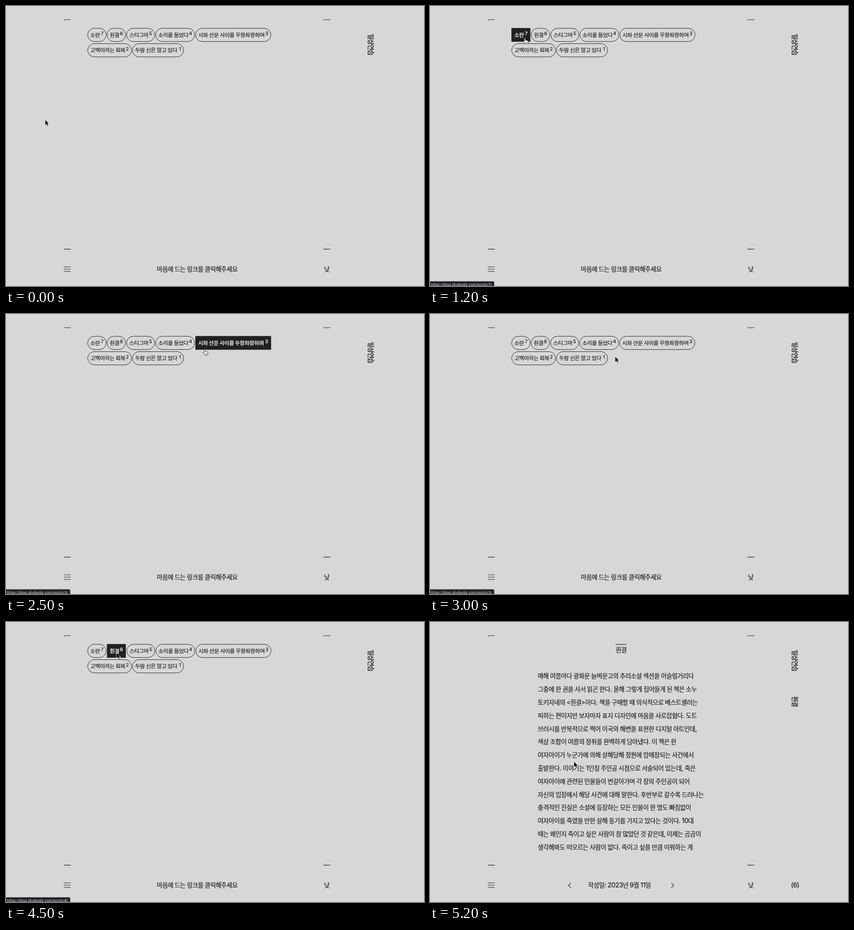
An HTML page that plays this animation: 914x613 px, repeating every 5700 ms.

```html
<!DOCTYPE html>
<html lang="ko">
<head>
<meta charset="utf-8">
<title>일상연습</title>
<style>
  html, body { margin: 0; width: 100%; height: 100%; overflow: hidden; background: #d7d7d7; }
  svg { display: block; }
  text {
    font: 13.5px Inter, "Noto Sans CJK KR", "Noto Sans CJK", sans-serif;
    letter-spacing: -.0333em; word-spacing: -.026em; white-space: pre;
    color: #1a1a1a; fill: currentColor; stroke: currentColor; stroke-width: .2;
  }
  .num { font-size: 1.066em; }
  .mid { text-anchor: middle; }
  .side { letter-spacing: -.07em; stroke-width: .35; }
  .line { fill: none; stroke: #222; stroke-width: 1.2; }
  .tag rect { fill: none; stroke: #222; rx: 14.5px; }
  .tag text { font-size: 11.9px; }
  .tag .sup { font-size: 10.6px; letter-spacing: 0; text-anchor: end; }
  .tag.on rect { fill: #212121; stroke: #212121; rx: 0; }
  .tag.on text { color: #e2e2e2; font-weight: 700; stroke: none; }
  #status text { font-size: 8.1px; letter-spacing: 0; color: #dcdee2; stroke: none; }
</style>
</head>
<body>
<svg width="914" height="613" viewBox="0 0 914 613">
  <path class="line" d="M126.5 30h15M694 30h15M126.5 532.4h15M694 532.4h15M126.5 571h15M126.5 576h15M126.5 581h15"/>
  <text class="side" transform="translate(793 61.5) rotate(90)">일상연습</text>
  <text class="mid" x="701.5" y="581">낮</text>

  <g id="list">
    <g id="tags"></g>
    <text class="mid" x="418" y="581">마음에 드는 링크를 클릭해주세요</text>
  </g>

  <g id="post">
    <path class="line" d="M406 49.2h23.5M308 571.2l-5.4 5.4 5.4 5.4M527.6 571.2l5.4 5.4-5.4 5.4"/>
    <text class="mid" x="418" y="65.6">흰결</text>
    <text class="side" transform="translate(793 162.5) rotate(90)">흰결</text>
    <g id="body"></g>
    <text class="mid" x="414.3" y="581" id="date"></text>
    <text class="mid" x="798.3" y="581"><tspan class="num">(6)</tspan></text>
  </g>

  <g id="status">
    <path d="M0 602.8h137.5q3 0 3 3V613H0z" fill="#202225" stroke="#8a8a8a" stroke-width=".5"/>
    <text x="1.8" y="612.7"></text>
  </g>

  <g id="cursor">
    <path id="arrow" transform="scale(1.06)" d="M0 0V12.2L2.8 9.6 4.7 13.8 6.7 12.9 4.9 8.9H8.5Z" fill="#000" stroke="#fff" stroke-width=".8"/>
    <g id="hand" stroke="#111" stroke-width=".8" stroke-linejoin="round">
      <path fill="#fff" d="M-1.3 1.2a1.2 1.2 0 0 1 2.4 0V5.2l1.3.1q.6-.5 1.4.1l.7.5q1-.5 1.6.5.9 0 .9 1.3V10q-.6 1.6-.9 3H.3Q-.8 11-2 9.6L-3.6 7.4q.4-1.6 1.7-.5l.6.7z"/>
      <path d="M1.3 8.8v2.4M3 8.8v2.4M4.7 8.8v2.4" stroke-width=".6"/>
    </g>
  </g>
</svg>
<script>
const LOOP = 5700, STEP = 100, BUSY = 4200, OPEN = 4700;
const $ = id => document.getElementById(id);
const digits = s => s.replace(/[\d.,:]+/g, '<tspan class="num">$&</tspan>');

const rows = [
  ['소란', '흰결', '스티그마', '소리를 들었다', '시와 산문 사이를 우왕좌왕하며'],
  ['고백이라는 회복', '두람 신은 알고 있다']
];
const TAG_H = 29, PAD = 5.7, GAP = 2.1;

// a tag is as wide as its syllables and spaces, plus its number and padding
function tagWidth(title) {
  const spaces = title.split(' ').length - 1;
  return (title.length - spaces) * 10.55 + spaces * 2.7 + 19.3;
}

const tags = [];
rows.forEach((titles, row) => {
  let x = 178.6;
  for (const title of titles) {
    const w = tagWidth(title);
    tags.push({ title, row, x, w, y: 48.8 + row * 33.6 });
    x += w + GAP;
  }
});
tags.forEach((tag, i) => { tag.id = tags.length - i; });

$('tags').innerHTML = tags.map(({ title, id, x, y, w }) => `<g class="tag">
  <rect x="${x}" y="${y}" width="${w}" height="${TAG_H}"/>
  <text x="${x + PAD}" y="${y + 18.7}">${title}</text>
  <text class="sup" x="${x + w - PAD}" y="${y + 15.5}">${id}</text></g>`).join('');
const tagEls = [...$('tags').children];

const lines = [
  '매해 여름마다 광화문 늘벼문고의 추리소설 섹션을 어슬렁거리다',
  '그중에 한 권을 사서 읽곤 한다. 올해 그렇게 집어들게 된 책은 소누',
  '토키자네의 &lt;흰결&gt;이다. 책을 구매할 때 의식적으로 베스트셀러는',
  '피하는 편이지만 보자마자 표지 디자인에 마음을 사로잡혔다. 도트',
  '브러시를 반복적으로 찍어 이국의 해변을 표현한 디지털 아트인데,',
  '색상 조합이 여름의 정취를 완벽하게 담아냈다. 이 책은 한',
  '여자아이가 누군가에 의해 살해당해 정원에 암매장되는 사건에서',
  '출발한다. 이야기는 1인칭 주인공 시점으로 서술되어 있는데, 죽은',
  '여자아이에 관련된 인물들이 번갈아가며 각 장의 주인공이 되어',
  '자신의 입장에서 해당 사건에 대해 말한다. 후반부로 갈수록 드러나는',
  '충격적인 진실은 소설에 등장하는 모든 인물이 한 명도 빠짐없이',
  '여자아이를 죽였을 만한 살해 동기를 가지고 있다는 것이다. 10대',
  '때는 왜인지 죽이고 싶은 사람이 참 많았던 것 같은데, 이제는 곰곰이',
  '생각해봐도 떠오르는 사람이 없다. 죽이고 싶을 만큼 미워하는 게'
];
$('body').innerHTML = lines.map((s, i) =>
  `<text x="235.6" y="${123.4 + i * 28.8}">${digits(s)}</text>`).join('');
$('date').innerHTML = digits('작성일: 2023년 9월 11일');

// stops of the pointer, eased in between
const stops = [
  { t: 0, x: 85.5, y: 248.8 },
  { t: 600, x: 177.5, y: 70 },
  { t: 700, x: 203, y: 70 },
  { t: 1100, x: 203, y: 70 },
  { t: 1800, x: 287, y: 66 },
  { t: 2500, x: 434.5, y: 77 },
  { t: 2900, x: 418, y: 93 },
  { t: 3500, x: 239, y: 91.5 },
  { t: 4000, x: 241.7, y: 67 },
  { t: 4880, x: 241.7, y: 67 },
  { t: 5200, x: 314.8, y: 305.3 }
];
const ease = k => k * k * (3 - 2 * k);

function pointer(t) {
  const i = stops.findIndex(s => s.t > t);
  if (i < 0) return stops[stops.length - 1];
  const a = stops[i - 1], b = stops[i];
  const k = ease((t - a.t) / (b.t - a.t));
  return { x: a.x + (b.x - a.x) * k, y: a.y + (b.y - a.y) * k };
}

const hit = (px, py) => tags.find(({ x, y, w }) =>
  px >= x && px <= x + w && py >= y && py <= y + TAG_H);

// the status bar keeps the last tag pointed at
let last = tags[0];
const states = Array.from({ length: LOOP / STEP }, (_, i) => {
  const t = i * STEP, { x, y } = pointer(t);
  const over = t < OPEN ? hit(x, y) : undefined;
  last = over || last;
  return { t, x, y, over, id: last.id };
});

const show = (el, on) => { el.style.display = on ? '' : 'none'; };
const clamp = v => Math.max(0, Math.min(1, v));
const barOpacity = t => clamp(Math.min(t - 800, 5200 - t) / 200);

function draw({ t, x, y, over, id }) {
  show($('list'), t < OPEN);
  show($('post'), t >= OPEN);
  tagEls.forEach((el, i) => {
    const tag = tags[i];
    const pushed = over && tag.row === over.row && tag.x > over.x;
    el.classList.toggle('on', tag === over);
    el.setAttribute('transform', `translate(${pushed ? .4 : 0} 0)`);
  });
  $('status').style.opacity = barOpacity(t);
  $('status').lastElementChild.textContent = `https://blog.divdivdiv.com/posts/${id}/`;
  const hand = over && t < BUSY;
  show($('hand'), hand);
  show($('arrow'), !hand);
  $('cursor').setAttribute('transform', `translate(${x} ${y})`);
}

let shown = -1;
const start = performance.now();
function tick() {
  const i = Math.floor((performance.now() - start) % LOOP / STEP);
  if (i !== shown) draw(states[shown = i]);
  requestAnimationFrame(tick);
}
tick();
</script>
</body>
</html>
```
